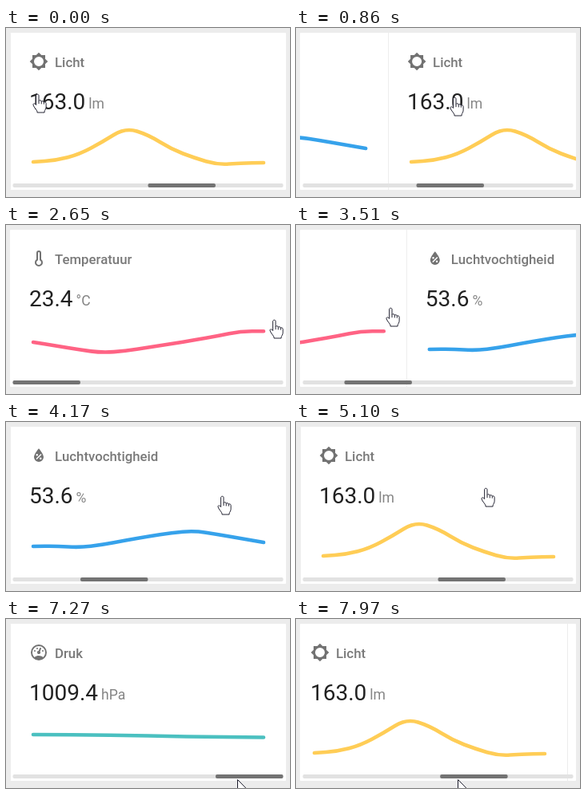
Recreate the animation shown at these times as an HTML page. Size 355 px wide and 212 px high, loop 8 s.

```html
<!DOCTYPE html>
<html lang="nl">
<head>
<meta charset="utf-8">
<title>Sensorcarrousel</title>
<style>
  html, body { margin: 0; width: 100%; height: 100%; overflow: hidden; background: #ececec; }
  svg { display: block; width: 100vw; height: 100vh; font-family: Roboto, sans-serif; }
  .icon { fill: #727272; fill-rule: evenodd; }
  .name { font-size: 16.8px; font-weight: 500; fill: #797979; }
  .value { font-size: 28px; font-weight: 400; fill: #212121; }
  .unit { font-size: 17.6px; fill: #858585; }
  .line { fill: none; stroke-width: 4.6; stroke-linecap: round; stroke-linejoin: round; }
  .cursor { fill: #fff; stroke: #1a1a2a; stroke-linejoin: round; }
</style>
</head>
<body>
<svg viewBox="0 0 355 212">
  <defs><clipPath id="clip"><rect x="5" y="6" width="345" height="197" rx="1"/></clipPath></defs>
  <rect width="355" height="212" fill="#ececec"/>
  <rect x="5" y="6" width="345" height="197" rx="1" fill="#fff"/>
  <g clip-path="url(#clip)"><g id="track"></g></g>
  <rect x="8.45" y="195" width="338.1" height="5" rx="2" fill="#e2e2e2"/>
  <rect id="thumb" y="195" width="84.5" height="5" rx="2" fill="#737373"/>
  <g id="hand" class="cursor">
    <g transform="translate(.5 .7) scale(.95)">
      <path d="M-2 13.5V1.2C-2 -1.1 1.6 -1.1 1.6 1.2V8.3C2.2 6.8 4.9 7.1 5 9C5.6 7.9 8 8.2 8.2 10C9 9.1 11.2 9.6 11.2 11.5V16C11.2 19 9.5 20 9 22.3V23.5H-.5V22.3C-1 20 -4.8 16.8 -5.7 13.7C-6.2 11.9 -4.5 11 -3.2 12.2Z"/>
      <path d="M1.6 8.3V12M5 9V12.3M8.2 10V12.6" fill="none"/>
    </g>
  </g>
  <path id="arrow" class="cursor" d="M.5 .5V16L4 12.7L6.5 18.3L9 17.2L6.6 11.7H11.4Z"/>
</svg>
<script>
const LOOP = 8000, PITCH = 345;

// Readings are heights of evenly spaced measurements
const slides = [
  { name: 'Temperatuur', value: '23.4', unit: '°C', color: '#ff6384',
    readings: [147, 151.7, 156.5, 160.2, 158, 153.5, 149, 144.3, 139.3, 133.3, 133.3],
    icon: 'M9 13V5A3 3 0 0 1 15 5V13A5 5 0 1 1 9 13M11 5A1 1 0 0 1 13 5V14.2A3 3 0 1 1 11 14.2Z' },
  { name: 'Luchtvochtigheid', value: '53.6', unit: '%', color: '#36a2eb',
    readings: [156, 155.5, 157.5, 154, 148.5, 143.5, 139, 136.5, 141, 146, 151],
    icon: 'M12 3.25C12 3.25 6 10 6 14A6 6 0 0 0 18 14C18 10 12 3.25 12 3.25M14.47 9.97L15.53 11.03L9.53 17.03L8.47 15.97Z' + dot(9.75, 11.25, 1.25) + dot(14.25, 15.75, 1.25) },
  { name: 'Licht', value: '163.0', unit: 'lm', color: '#ffcd56',
    readings: [168, 166, 158.5, 143, 125, 134, 152, 163, 171.5, 169.5, 169],
    icon: 'M20 15.31L23.31 12L20 8.69V4H15.31L12 .69L8.69 4H4V8.69L.69 12L4 15.31V20H8.69L12 23.31L15.31 20H20Z' + dot(12, 12, 6) },
  { name: 'Druk', value: '1009.4', unit: 'hPa', color: '#4bc0c0',
    readings: [145, 145.5, 147.5, 148.5],
    icon: dot(12, 12, 10) + 'M12 4A8 8 0 0 1 20 12C20 14.4 19 16.5 17.3 18C14.5 15.4 9.7 15.3 6.7 18C5 16.5 4 14.4 4 12A8 8 0 0 1 12 4M13.1 6.54L11.71 10A2 2 0 1 0 13.57 10.76L14.96 7.29A1 1 0 0 0 13.1 6.54Z' + dot(10, 7, 1) + dot(7, 10, 1) + dot(17, 10, 1) }
];

// The hand drags a slide, lets go, and comes to rest
const swipes = [
  { start: 710, end: 1720, from: 2, to: 1, drop: [345, 90], rest: [93, 96] },
  { start: 1860, end: 2770, from: 1, to: 0, drop: [335, 110], rest: [335, 119] },
  { start: 3230, end: 4170, from: 0, to: 1, drop: [60, 100], rest: [270, 93] },
  { start: 4320, end: 5220, from: 1, to: 2, drop: [50, 95], rest: [237, 83] },
  { start: 5370, end: 6170, from: 2, to: 3, drop: [95, 107], rest: [95, 107] }
];
const HOME = [39, 83], BAR = 6450, FRAME = 135;
const barDrag = { start: 7550, end: 7970, from: 3, to: 2.032 };
const bursts = [...swipes, { start: BAR, end: 6600 }, { start: 7150, end: 7270 }, barDrag];

// [time, x, y] of the pointer tip
const pointer = [[0, ...HOME]];
swipes.forEach((s, i) => {
  const span = s.end - s.start;
  pointer.push(
    [s.start - FRAME, ...(i ? swipes[i - 1].rest : HOME)],
    [s.start + .4 * span, ...s.drop],
    [s.start + .8 * span, ...s.rest]);
});
pointer[pointer.length - 1][0] = 5900;
pointer.push([6170, 279, 181], [BAR, 289, 202], [6600, 289, 195],
  [7270, 289, 201], [barDrag.start - FRAME, 289, 201], [barDrag.end, 202, 201]);

const el = id => document.getElementById(id);
const track = el('track'), thumb = el('thumb'), hand = el('hand'), arrow = el('arrow');
const clamp = u => Math.min(1, Math.max(0, u));
const ease = u => u * u * (3 - 2 * u);

function dot(x, y, r) {
  return `M${x - r} ${y}a${r} ${r} 0 1 0 ${2 * r} 0a${r} ${r} 0 1 0 ${-2 * r} 0Z`;
}

// Quadratic curve through the midpoints between readings
function curve(ys) {
  const step = 288 / (ys.length - 1);
  let d = `M34 ${ys[0]}`;
  for (let i = 0; i < ys.length - 1; i++) {
    const x = 34 + i * step;
    d += `Q${x} ${ys[i]} ${x + step / 2} ${(ys[i] + ys[i + 1]) / 2}`;
  }
  return d + `L322 ${ys[ys.length - 1]}`;
}

function slideMarkup(s, i) {
  return `<g transform="translate(${i * PITCH})">
    <path class="icon" transform="translate(29 30)" d="${s.icon}"/>
    <text class="name" x="61" y="49">${s.name}</text>
    <text class="value" x="29" y="102">${s.value}<tspan class="unit" dx="4" dy="-1">${s.unit}</tspan></text>
    <path class="line" stroke="${s.color}" d="${curve(s.readings)}"/>
    <path d="M350.5 6V203" stroke="#ececec"/>
  </g>`;
}

// The screen refreshes in even steps during each burst and rests in between
function refreshTime(now) {
  const b = bursts.filter(b => b.start <= now).pop();
  if (!b) return 0;
  const span = b.end - b.start, step = span / Math.round(span / FRAME);
  return Math.min(b.end, b.start + Math.floor((now - b.start) / step + .15) * step);
}

function pagePosition(t) {
  const progress = (s, part) => clamp((t - s.start + FRAME) / ((s.end - s.start) * part + FRAME));
  if (t >= barDrag.start) return barDrag.from + (barDrag.to - barDrag.from) * progress(barDrag, 1);
  const s = swipes.filter(s => s.start <= t).pop();
  return s ? s.from + (s.to - s.from) * ease(progress(s, .6)) : swipes[0].from;
}

function pointerPosition(t) {
  const i = pointer.findIndex(k => k[0] > t);
  if (i < 0) return pointer[pointer.length - 1].slice(1);
  const [t0, x0, y0] = pointer[i - 1], [t1, x1, y1] = pointer[i];
  const u = (t - t0) / (t1 - t0);
  return [x0 + (x1 - x0) * u, y0 + (y1 - y0) * u].map(Math.round);
}

function draw(time) {
  const t = refreshTime(time % LOOP);
  const page = pagePosition(t), [x, y] = pointerPosition(t);
  const onBar = t >= BAR;
  track.setAttribute('transform', `translate(${-page * PITCH})`);
  thumb.setAttribute('x', 8.45 + 84.5 * page);
  hand.setAttribute('visibility', onBar ? 'hidden' : 'visible');
  arrow.setAttribute('visibility', onBar ? 'visible' : 'hidden');
  (onBar ? arrow : hand).setAttribute('transform', `translate(${x} ${y})`);
}

track.innerHTML = slides.map(slideMarkup).join('');
const began = performance.now();
function tick() {
  draw(performance.now() - began);
  requestAnimationFrame(tick);
}
tick();
</script>
</body>
</html>
```
